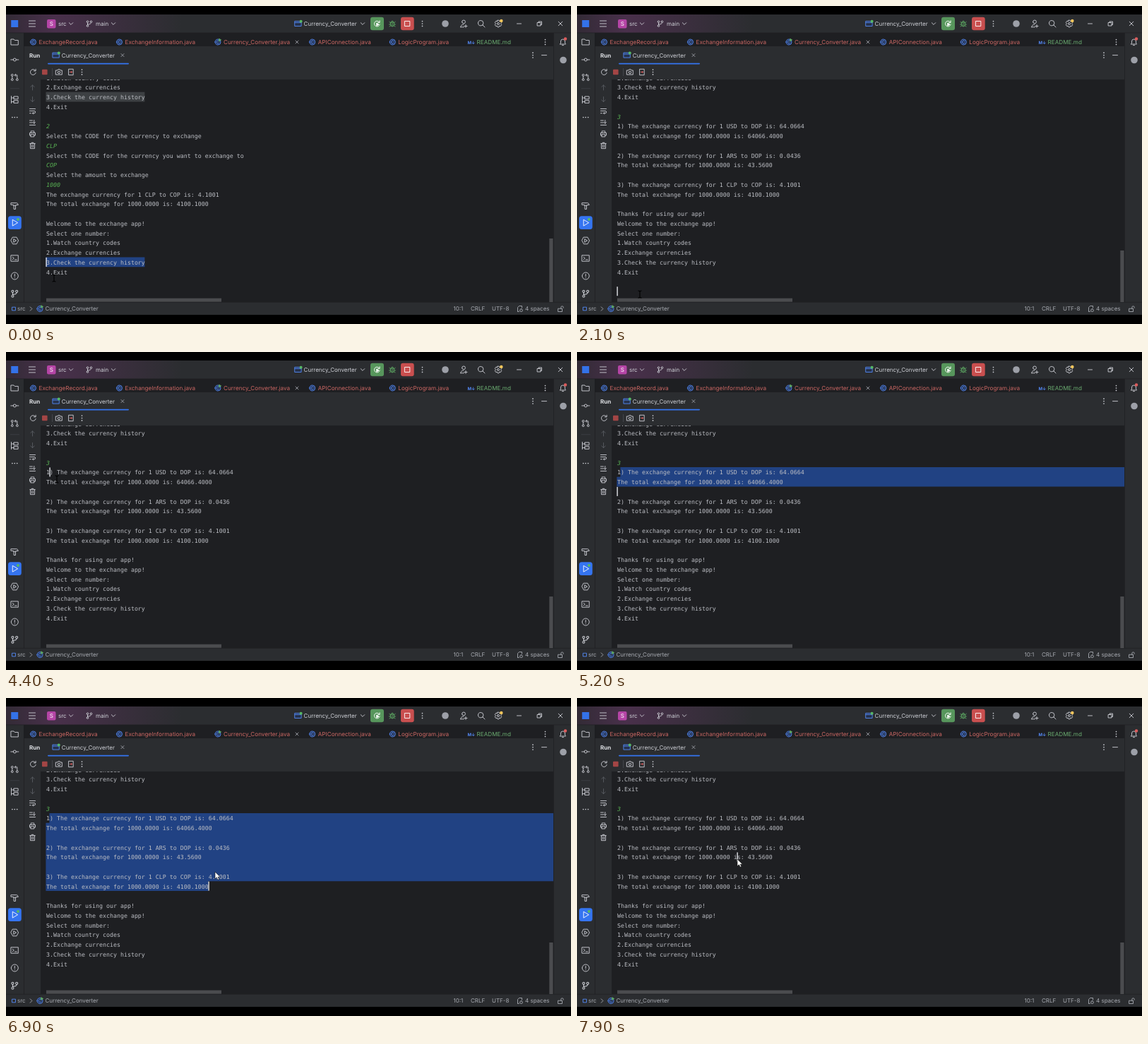
An HTML page that plays this animation: 800x450 px, repeating every 8 s.

```html
<!DOCTYPE html>
<html lang="en">
<head>
<meta charset="utf-8">
<title>Currency converter console</title>
<style>
html, body { margin: 0; width: 100%; height: 100%; overflow: hidden; background: #000; }
svg { display: block; width: 800px; height: 450px; }
text { font: 8px Inter, "Open Sans", sans-serif; fill: #ced0d6; text-rendering: geometricPrecision; white-space: pre; }
.mono text { font: 8.305px "DejaVu Sans Mono", "Noto Sans Mono", monospace; fill: #bcbec4; }
.mono .input { fill: #58b053; font-style: italic; }
.icon { fill: none; stroke: #ced0d6; stroke-width: .9; stroke-linecap: round; stroke-linejoin: round; }
</style>
</head>
<body>
<svg id="stage" viewBox="0 0 800 450">
  <defs>
    <linearGradient id="tint" gradientUnits="userSpaceOnUse" x1="0" y1="0" x2="250" y2="0">
      <stop offset="0" stop-color="#332b36"/>
      <stop offset=".28" stop-color="#49304b"/>
      <stop offset="1" stop-color="#2b2d30"/>
    </linearGradient>
    <clipPath id="view"><rect x="49" y="104" width="726" height="315"/></clipPath>
  </defs>
  <g id="panels"></g>
  <g id="console" class="mono" clip-path="url(#view)">
    <path id="echo" fill="#3d4043"/>
    <path id="selection" fill="#214283"/>
    <g id="before"></g>
    <g id="after"></g>
    <text id="typed" class="input" x="57" y="407.2">3</text>
    <rect id="caret" width="1.4" height="13" fill="#e0e2e6"/>
  </g>
  <g id="chrome"></g>
  <path id="beam" d="M-2.5-5Q-.5-5 0-4Q.5-5 2.5-5M0-4V4M-2.5 5Q-.5 5 0 4Q.5 5 2.5 5" fill="none" stroke="#000" stroke-width="1.1"/>
  <path id="arrow" d="M0 0V10L2.4 7.8L4 11.3L5.7 10.5L4.2 7.2H7.3Z" fill="#fff" stroke="#111" stroke-width=".6"/>
</svg>
<script>
const $ = id => document.getElementById(id);
const LOOP = 8000, STEP = 100, LEFT = 57, CELL = 56.4, CHAR = 5, LINE = 13.75, FIRST = 101.75;
const GREY = '#ced0d6', DIM = '#9da0a8', GREEN = '#5fad65', RED = '#db5c5c', BLUE = '#548af7';
const rowY = row => FIRST + row * LINE;

function add(parent, tag, attrs, content) {
  const node = document.createElementNS('http://www.w3.org/2000/svg', tag);
  for (const key in attrs) node.setAttribute(key, attrs[key]);
  if (content !== undefined) node.textContent = content;
  parent.appendChild(node);
  return node;
}

const chrome = $('chrome');
const box = (x, y, width, height, fill, rx = 0, parent = chrome) =>
  add(parent, 'rect', { x, y, width, height, fill, rx });
const disc = (cx, cy, r, fill) => add(chrome, 'circle', { cx, cy, r, fill });
const label = (x, y, content, fill = GREY, style = '') =>
  add(chrome, 'text', { x, y: y + 2.9, style: `fill:${fill};${style}` }, content);
const icon = (x, y, d, stroke = GREY, fill = 'none') =>
  add(chrome, 'path', { class: 'icon', d, transform: `translate(${x} ${y})`, style: `stroke:${stroke};fill:${fill}` });
const dots = (x, y, flat) => [-3.4, 0, 3.4].forEach(d => disc(x + (flat ? d : 0), y + (flat ? 0 : d), .85, GREY));

const shapes = {
  down: 'M-2.7-1.3L0 1.4L2.7-1.3',
  right: 'M-1.3-2.7L1.4 0L-1.3 2.7',
  cross: 'M-2-2L2 2M2-2L-2 2',
  ring: 'M-4 0A4 4 0 1 1 4 0A4 4 0 1 1-4 0Z',
  branch: 'M-2.5-1.5V1.8M-2.5 1Q2.5 1 2.5-1.5M-3.8-2.8A1.3 1.3 0 1 1-1.2-2.8A1.3 1.3 0 1 1-3.8-2.8M1.2-2.8A1.3 1.3 0 1 1 3.8-2.8A1.3 1.3 0 1 1 1.2-2.8M-3.8 3.1A1.3 1.3 0 1 1-1.2 3.1A1.3 1.3 0 1 1-3.8 3.1',
  rerun: 'M3.2-2A3.9 3.9 0 1 0 3.7 1M3.6-4.2V-1.6H1',
  window: 'M-4.5-3.5H4.5V3.5H-4.5ZM-4.5-1.5H4.5',
  play: 'M-3-4.2L4 0L-3 4.2Z'
};

function drawPanels() {
  const panel = (...a) => box(...a, 0, $('panels'));
  panel(0, 0, 800, 450, '#000');
  panel(0, 12, 800, 425, '#2b2d30');
  panel(0, 12, 800, 26, 'url(#tint)');
  panel(25, 38, 750, 19, '#1e1f22');
  panel(49, 104, 726, 315, '#1e1f22');
  panel(0, 37.6, 800, .7, '#1e1f22');
  panel(25, 38, .7, 381, '#1e1f22');
  panel(775, 38, .7, 381, '#1e1f22');
  panel(0, 418.8, 800, .7, '#1e1f22');
}

function classIcon(x, y, runnable) {
  icon(x, y, shapes.ring, BLUE, '#25324d');
  icon(x, y, 'M1.6-1.3A2 2 0 1 0 1.6 1.3', BLUE);
  if (runnable) icon(x + 3, y - 3, 'M-1-1.6L1.6 0L-1 1.6Z', GREEN, GREEN);
}

function runConfig(x, y) {
  icon(x, y, shapes.window, BLUE, '#25324d');
  disc(x + 4, y - 3.2, 2, '#57b865');
  label(x + 8, y, 'Currency_Converter');
}

function drawTitleBar() {
  const y = 25;
  box(7.2, 20, 10, 10, '#3472e8');
  icon(37, y, 'M-4.5-4H4.5M-4.5 0H4.5M-4.5 4H4.5');
  box(58, 19, 12.5, 12.5, '#b545a6', 2);
  label(61.7, y, 'S', '#fff');
  label(74, y, 'src');
  icon(92, y, shapes.down);
  icon(118, y, shapes.branch);
  label(127, y, 'main');
  icon(152, y, shapes.down);
  runConfig(413.6, y);
  icon(505, y, shapes.down);
  box(516, 15.8, 19, 18.5, '#57965c', 3);
  icon(525.5, y, shapes.rerun, '#fff');
  icon(526, y + 1, 'M-1-1.8L2 0L-1 1.8Z', '#fff', '#fff');
  icon(547, y, 'M-2.3-1.8H2.3V1.5A2.3 2.5 0 0 1-2.3 1.5ZM-1.5-2A1.5 1.8 0 0 1 1.5-2M-4.2-2.6L-2.3-1M4.2-2.6L2.3-1M-4.5 1H-2.3M4.5 1H2.3M-4 4L-2 2.5M4 4L2 2.5M0-1V3.5', GREEN);
  box(559, 15.8, 18.7, 18.5, '#c94f4f', 3);
  icon(568.3, y, 'M-3.5-3.5H3.5V3.5H-3.5Z', '#fff');
  dots(589.5, y);
  disc(622, y, 4.8, DIM);
  icon(648, y, 'M-2.4-2.6A2.4 2.4 0 1 1 2.4-2.6A2.4 2.4 0 1 1-2.4-2.6M-4.3 4.8Q-4 1.2 0 1.2M-4.3 4.8H.5M3 1.5V5.5M1 3.5H5');
  icon(673, y, 'M-4.5-.8A3.7 3.7 0 1 1 2.9-.8A3.7 3.7 0 1 1-4.5-.8M2 2L5 5');
  icon(697, y, 'M-1-4.8H1L1.6-3.2L3.4-3.6L4.7-1.6L3.5 0L4.7 1.6L3.4 3.6L1.6 3.2L1 4.8H-1L-1.6 3.2L-3.4 3.6L-4.7 1.6L-3.5 0L-4.7-1.6L-3.4-3.6L-1.6-3.2ZM-1.5 0A1.5 1.5 0 1 1 1.5 0A1.5 1.5 0 1 1-1.5 0');
  disc(701.3, 21, 2.3, '#f2c55c');
  icon(726.5, y, 'M-3 0H3');
  icon(755.5, y, 'M-3-1.5H1.5V3H-3ZM-1.5-1.5V-3H3V1.5H1.5');
  icon(785, y, 'M-2.8-2.8L2.8 2.8M2.8-2.8L-2.8 2.8');
}

function drawTabs() {
  const y = 51, size = 'font-size:8.17px';
  [[38.5, 'ExchangeRecord'], [160.5, 'ExchangeInformation'], [300, 'Currency_Converter'],
   [433.7, 'APIConnection'], [547.3, 'LogicProgram']].forEach(([x, name], i) => {
    classIcon(x, y, i === 2);
    label(x + 8, y, name + '.java', '#cb6763', size);
  });
  icon(412, y, shapes.cross, DIM);
  label(653.5, y, 'M↓', BLUE, 'font-size:6px;font-weight:700');
  label(666.5, y, 'README.md', '#6aab70', size);
  dots(763.5, y);
}

function drawRunHeader() {
  const y = 69.6;
  label(33, y, 'Run', '#dfe1e5', 'font-weight:700');
  runConfig(70.8, y);
  icon(165, y, shapes.cross, DIM);
  box(59, 80.8, 115, 1.6, '#3574f0', .8);
  dots(746, y);
  icon(762, y, 'M-3.5 0H3.5');
  icon(38.5, 93.5, shapes.rerun);
  box(51, 89.7, 7.6, 7.6, '#a34545', 1);
  box(65, 88, .7, 11, '#4e5157');
  icon(75, 93.5, 'M-4.3-2.5H-2L-1.2-3.8H1.2L2-2.5H4.3V3.6H-4.3ZM-1.7.4A1.7 1.7 0 1 1 1.7.4A1.7 1.7 0 1 1-1.7.4');
  icon(92, 93.5, 'M-3-4.2H3.2V4.2H-3Z');
  icon(92, 93.5, 'M-1.5 0H1.6M.4-1.3L1.7 0L.4 1.3', RED);
  dots(107.5, 93.5);
}

function drawSideBars() {
  const x = 12.3;
  icon(x, 51, 'M-5-4H-1.3L0-2.5H5V4H-5Z');
  icon(x, 76, 'M-5.5 0H-2A2 2 0 1 1 2 0A2 2 0 1 1-2 0M2 0H5.5');
  icon(x, 101, 'M-3.5-1.7V1.7M-4.9-3.2A1.4 1.4 0 1 1-2.1-3.2A1.4 1.4 0 1 1-4.9-3.2M-4.9 3.2A1.4 1.4 0 1 1-2.1 3.2A1.4 1.4 0 1 1-4.9 3.2M2.1 3.2A1.4 1.4 0 1 1 4.9 3.2A1.4 1.4 0 1 1 2.1 3.2M3.5 1.7V-3.2H0M1.5-4.8L0-3.2L1.5-1.6');
  box(6, 116.5, 13, .7, '#43454a');
  icon(x, 132.5, 'M-4.8-5V5M-4.8-2.5H-1M-4.8 3H-1M-1-4.5H4.8V-.8H-1ZM-1 1.2H4.8V4.8H-1Z');
  dots(x, 157.5, true);
  icon(x, 282.5, 'M-5-3.8H2.5Q4.5-3.8 5-1H2V-.2H-2V-1.2H-5ZM-1.2-.2V5H1.2V-.2');
  box(3, 297.3, 18.8, 18.8, '#3574f0', 3.5);
  icon(x + .3, 306.7, shapes.play, '#fff');
  disc(17, 302, 2, '#57b865');
  icon(x, 332, 'M-2.7-4.8H2.7L5.3 0L2.7 4.8H-2.7L-5.3 0ZM-1.2-2.2L2.2 0L-1.2 2.2Z');
  icon(x, 357, 'M-5-4.2H5V4.2H-5ZM-3-1.8L-1 0L-3 1.8M.2 2H3');
  icon(x, 382, 'M-5 0A5 5 0 1 1 5 0A5 5 0 1 1-5 0M0-2.6V.6M0 2.4V2.5');
  icon(x, 407, shapes.branch).setAttribute('transform', `translate(${x} 407) scale(1.15)`);

  const g = 37.5;
  icon(g, 115.5, 'M0 3.5V-3.5M-2.7-1L0-3.5L2.7-1', '#5a5d63');
  icon(g, 132, 'M0-3.5V3.5M-2.7 1L0 3.5L2.7 1', '#5a5d63');
  icon(g, 148.5, 'M-4-3H4M-4 0H2.5A1.6 1.6 0 0 1 2.5 3.2H0M1.3 1.9L0 3.2L1.3 4.5M-4 3.2H-2');
  icon(g, 165, 'M-4-3H0M-4 0H0M-4 3.5H4M2.3-3.5V1.2M.7-.4L2.3 1.2L3.9-.4');
  icon(g, 181, 'M-2.3-1.5V-4H2.3V-1.5M-2.3 2H-4V-1.5H4V2H2.3M-2.3.8H2.3V4H-2.3Z');
  icon(g, 197.5, 'M-3.8-2.8H3.8M-1.3-2.8V-4.2H1.3V-2.8M-3-2.8V4.2H3V-2.8M-1-.8V2.4M1-.8V2.4');

  icon(788.5, 51, 'M-4 3H4L3 1.3V-1A3 3 0 0 0-3-1V1.3ZM-1 4.6H1');
  disc(792, 46.5, 2.2, RED);
  disc(789, 76.5, 4.8, DIM);
}

function drawStatusBar() {
  const y = 428.5, grey = '#a8abb2';
  icon(11.2, y, 'M-2.3-2.3H2.3V2.3H-2.3Z', BLUE);
  label(16, y, 'src', grey);
  icon(35.5, y, shapes.right, grey);
  classIcon(48, y, true);
  label(55.5, y, 'Currency_Converter', grey);
  label(633.5, y, '10:1', grey);
  label(658, y, 'CRLF', grey);
  label(688, y, 'UTF-8', grey);
  icon(728, y, 'M-3.5 3.8V-2L-1.5-4H2.5V-1.5M-3.5 3.8H-1.5M1.5.2A1.9 1.9 0 1 1 1.5 4A1.9 1.9 0 1 1 1.5.2', grey);
  label(735, y, '4 spaces', grey);
  icon(785, y, 'M-3-.3H2.5V4H-3ZM.8-.3V-2A1.7 1.7 0 0 1 4.2-2V-1.3', grey);
}

const menu = ['1.Watch country codes', '2.Exchange currencies', '3.Check the currency history', '4.Exit'];
const greeting = ['Welcome to the exchange app!', 'Select one number:', ...menu];
const rate = (from, to, value) => `The exchange currency for 1 ${from} to ${to} is: ${value}`;
const total = value => `The total exchange for 1000.0000 is: ${value}`;
// A leading ">" marks text the user typed.
const before = [...menu, '', '>2',
  'Select the CODE for the currency to exchange', '>CLP',
  'Select the CODE for the currency you want to exchange to', '>COP',
  'Select the amount to exchange', '>1000',
  rate('CLP', 'COP', '4.1001'), total('4100.1000'), '', ...greeting];
const after = [...menu.slice(1), '', '>3',
  '1) ' + rate('USD', 'DOP', '64.0664'), total('64066.4000'), '',
  '2) ' + rate('ARS', 'DOP', '0.0436'), total('43.5600'), '',
  '3) ' + rate('CLP', 'COP', '4.1001'), total('4100.1000'), '',
  'Thanks for using our app!', ...greeting];

function print(group, lines) {
  lines.forEach((line, row) => {
    const typed = line[0] === '>';
    add(group, 'text', { x: LEFT, y: rowY(row) + 2.95, class: typed ? 'input' : '' }, typed ? line.slice(1) : line);
  });
}

const cellX = col => CELL + col * CHAR;
const cellTop = row => rowY(row) - LINE / 2 - .6;
const span = (x0, x1, row, rows = 1) => `M${x0} ${cellTop(row)}H${x1}v${rows * LINE}H${x0}Z`;

drawPanels();
print($('before'), before);
print($('after'), after);
$('echo').setAttribute('d', span(cellX(0), cellX(28), 2));
box(57, 413.6, 248, 5, '#4b4c4f');
const thumb = box(769.3, 329, 5.2, 90, '#4b4c4f');
drawTitleBar();
drawTabs();
drawRunHeader();
drawSideBars();
drawStatusBar();

const CLICK = 800, TYPE = 1600, ENTER = 1900, PRESS = 4200, DRAG = 4800, RELEASE = 5900, DESELECT = 7700;
const blinkStarts = [0, CLICK, TYPE, ENTER, PRESS, RELEASE, DESELECT];
const pointerPath = [[200, 68, 385], [700, 89, 408], [2600, 89, 408], [4000, 72, 180],
  [DRAG, 72, 180], [RELEASE, 292, 268], [6500, 296, 246], [7000, 296, 246], [7600, 227, 228]];
const dragPath = [[DRAG, 1, 5], [RELEASE, 46, 12]];

const smooth = p => p * p * (3 - 2 * p);
function follow(path, t) {
  const i = path.findIndex(point => point[0] > t);
  if (i === 0) return path[0].slice(1);
  if (i < 0) return path[path.length - 1].slice(1);
  const [t0, x0, y0] = path[i - 1], [t1, x1, y1] = path[i];
  const p = smooth((t - t0) / (t1 - t0));
  return [x0 + (x1 - x0) * p, y0 + (y1 - y0) * p];
}

function caretAt(t) {
  if (t < CLICK) return [0, 19];
  if (t < TYPE) return [0, 22];
  if (t < ENTER) return [1, 22];
  if (t < PRESS) return [0, 22];
  if (t >= DESELECT) return [34, 9];
  const [col, row] = follow(dragPath, t).map(Math.round);
  return [Math.min(col, after[row].length), row];
}

function selectionPath(t, col, row) {
  if (t < CLICK) return span(cellX(0), cellX(28), 19);
  if (t < DRAG || t >= DESELECT) return '';
  if (row === 5) return span(cellX(1), cellX(col), 5);
  const middle = row > 6 ? span(cellX(0), 775, 6, row - 6) : '';
  return span(cellX(1), 775, 5) + middle + span(cellX(0), cellX(col), row);
}

const show = (node, on) => node.setAttribute('display', on ? 'inline' : 'none');

function render(t) {
  const printed = t >= ENTER;
  show($('before'), !printed);
  show($('after'), printed);
  show($('typed'), t >= TYPE && !printed);
  show($('echo'), t < CLICK);
  thumb.setAttribute('y', printed ? 346 : 329);
  thumb.setAttribute('height', printed ? 73 : 90);

  const [col, row] = caretAt(t);
  $('selection').setAttribute('d', selectionPath(t, col, row));
  $('caret').setAttribute('x', cellX(col));
  $('caret').setAttribute('y', cellTop(row) + .4);
  const since = t - blinkStarts.filter(s => s <= t).pop();
  const dragging = t >= DRAG && t < RELEASE;
  show($('caret'), dragging || since % 1000 < 500);

  const [x, y] = follow(pointerPath, t);
  for (const id of ['beam', 'arrow']) $(id).setAttribute('transform', `translate(${x} ${y})`);
  show($('beam'), t < DRAG);
  show($('arrow'), t > RELEASE);
}

const start = performance.now();
function tick() {
  const elapsed = (performance.now() - start) % LOOP;
  render(Math.floor(elapsed / STEP) * STEP);
  requestAnimationFrame(tick);
}
tick();
</script>
</body>
</html>
```
